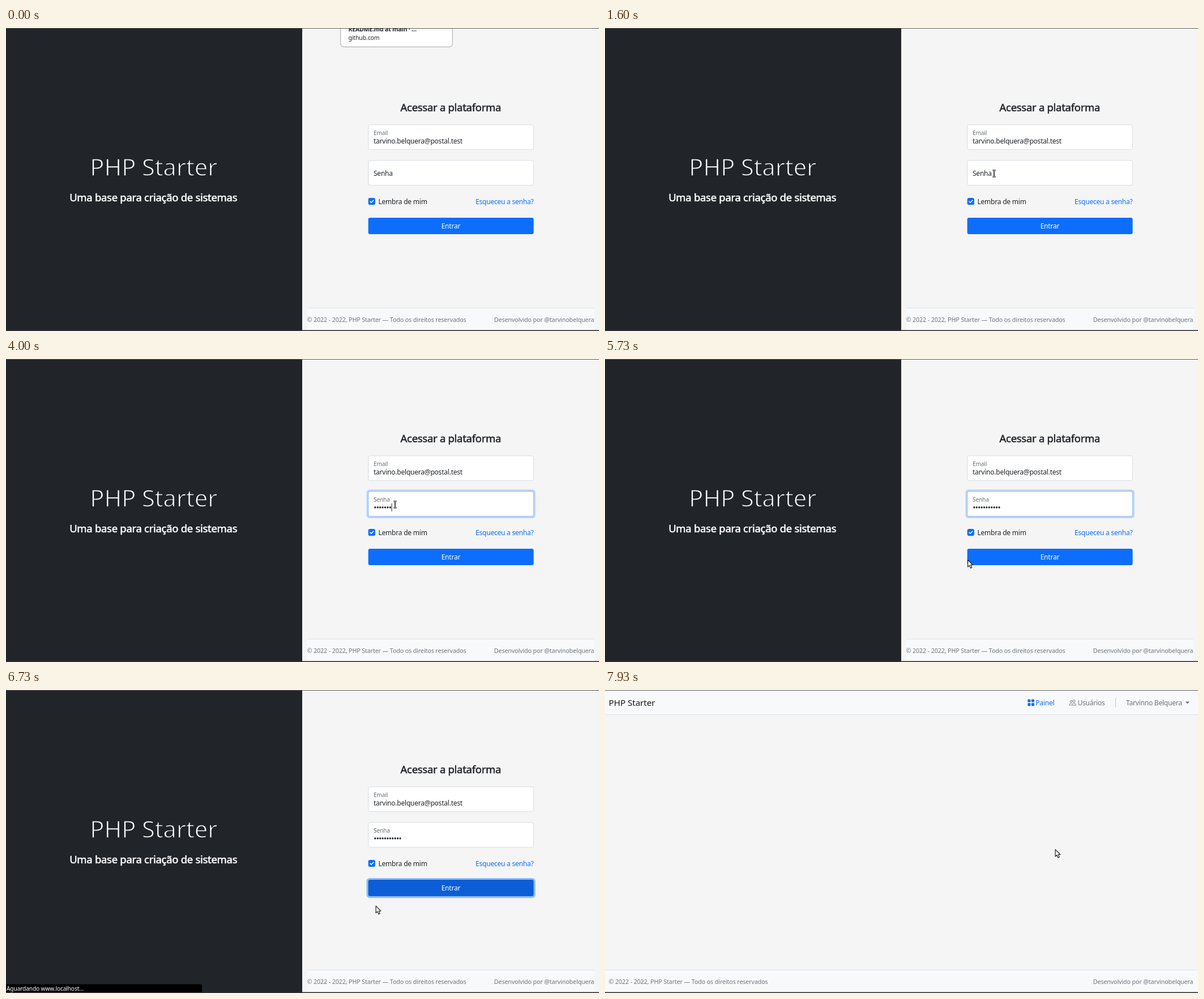
Write an HTML page that moves like this. It is 1047 by 535 pixels and loops after 8 s.

```html
<!DOCTYPE html>
<html lang="pt-BR">
<head>
<meta charset="utf-8">
<title>PHP Starter</title>
<style>
html, body { margin: 0; width: 100%; height: 100%; overflow: hidden; background: #f5f5f5; }
svg { display: block; width: 100%; height: 100%; }
text { font: 12px "Noto Sans", "Open Sans", sans-serif; letter-spacing: -.22px; fill: #212529; }
.end { text-anchor: end; }
.mid { text-anchor: middle; }
/* a stroke in the panel colour thins the glyphs to a light weight */
.display { font-size: 42.3px; letter-spacing: -.45px; fill: #fff; stroke: #212529; stroke-width: 1.4; }
.heading { font-size: 18.4px; letter-spacing: -.24px; stroke: #212529; stroke-width: .55; }
.label { font-size: 10.2px; letter-spacing: -.19px; fill: #6e7173; }
.small { font-size: 10.7px; letter-spacing: -.11px; fill: #6c757d; }
.tip { font-size: 10.5px; letter-spacing: -.15px; }
.tip.strong { font-weight: 700; letter-spacing: -.18px; }
.brand { font-size: 15.3px; letter-spacing: -.1px; fill: #191919; }
.status { font-size: 10.2px; letter-spacing: -.14px; fill: #fff; }
.white { fill: #fff; }
.heading.white { stroke: #fff; }
.blue { fill: #0d6efd; }
.nav { fill: #707172; }
.field { fill: #fff; stroke: #ced4da; stroke-width: .8; }
.focus { stroke: #86b7fe; }
.rule { stroke: #dee2e6; stroke-width: 1; }
.bar { fill: #f8f9fa; }
.outline { fill: none; stroke: #707172; stroke-width: .9; }
</style>
</head>
<body>
<svg viewBox="0 0 1047 535">
  <rect width="1047" height="535" fill="#f5f5f5"/>

  <g id="login">
    <rect width="523" height="535" fill="#212529"/>
    <text class="display mid" x="260.5" y="261">PHP Starter</text>
    <text class="heading mid white" x="260.2" y="305.5">Uma base para criação de sistemas</text>

    <text class="heading mid" x="785.3" y="147">Acessar a plataforma</text>
    <rect class="field" x="639.9" y="170.9" width="291.4" height="43.8" rx="3"/>
    <text class="label" x="649" y="188.5">Email</text>
    <text x="649" y="203.5">tarvino.belquera@postal.test</text>

    <rect id="fieldRing" class="blue" x="636.5" y="230.5" width="298.2" height="50.6" rx="5.5" opacity=".25"/>
    <rect id="field" class="field" x="639.9" y="233.9" width="291.4" height="43.8" rx="3"/>
    <text id="placeholder" x="649" y="260.5">Senha</text>
    <text id="label" class="label" x="649" y="251.5">Senha</text>
    <g id="dots" fill="#212529"></g>
    <rect id="caret" y="255" width="1" height="14" fill="#212529"/>

    <rect class="blue" x="639.6" y="300" width="12.3" height="12.3" rx="3"/>
    <path d="M642.9 306.3l2 2 3.9-4" fill="none" stroke="#fff" stroke-width="1.6" stroke-linecap="round" stroke-linejoin="round"/>
    <text x="657.5" y="310.5">Lembra de mim</text>
    <text class="end blue" x="931.5" y="310.5">Esqueceu a senha?</text>

    <rect id="buttonRing" x="636.5" y="332" width="298.2" height="35.2" rx="5.5" fill="#3184fd" opacity=".5"/>
    <rect id="button" x="639.6" y="335" width="292" height="29" rx="3"/>
    <text class="mid white" x="785.4" y="354.2">Entrar</text>

    <rect class="bar" x="532" y="494" width="506.5" height="39"/>
    <path class="rule" d="M532 494.5H1038.5"/>
    <text class="small" x="531.5" y="519">© 2022 - 2022, PHP Starter — Todo os direitos reservados</text>
  </g>

  <g id="panel">
    <path class="bar" d="M0 0H1047V43H0zM0 494H1047V535H0z"/>
    <path class="rule" d="M0 43.5H1047M0 494.5H1047"/>
    <text class="brand" x="6.5" y="27.7">PHP Starter</text>
    <g class="blue">
      <rect x="746.3" y="16.5" width="5.1" height="5.1" rx="1"/>
      <rect x="752.9" y="16.5" width="5.1" height="5.1" rx="1"/>
      <rect x="746.3" y="23.1" width="5.1" height="5.1" rx="1"/>
      <rect x="752.9" y="23.1" width="5.1" height="5.1" rx="1"/>
    </g>
    <text class="blue" x="760.3" y="26.7">Painel</text>
    <g class="outline">
      <circle cx="828" cy="19.6" r="2"/>
      <path d="M824.5 26.8c0-4.6 7.1-4.6 7.1 0z"/>
      <circle cx="823.2" cy="20.1" r="1.7"/>
      <path d="M823.6 26.8H820.1c0-2.6 1.4-3.7 4-3.5"/>
    </g>
    <text class="nav" x="834.5" y="26.7">Usuários</text>
    <path d="M901.5 14V31" stroke="#bfc0c1"/>
    <text class="nav" x="920" y="26.7">Tarvinno Belquera</text>
    <path class="nav" d="M1024.6 20.4h7.6l-3.8 3.9z"/>
    <text class="small" x="6.5" y="519">© 2022 - 2022, PHP Starter — Todo os direitos reservados</text>
  </g>

  <text class="small end" x="1038.5" y="519">Desenvolvido por @tarvinobelquera</text>

  <g id="tooltip">
    <rect x="590" y="-12" width="199" height="46.3" rx="7" fill="#000" opacity=".15"/>
    <rect x="590.8" y="-12" width="197.4" height="45.2" rx="6" fill="#fff" stroke="#aaa" stroke-width=".9"/>
    <text class="tip strong" x="604.5" y="6">README.md at main · …</text>
    <text class="tip" x="604.5" y="21.3">github.com</text>
  </g>

  <g id="status">
    <path d="M0 519.6H343.5a2.5 2.5 0 0 1 2.5 2.5V534H0z"/>
    <text class="status" x="1" y="530.7">Aguardando www.localhost…</text>
  </g>

  <rect width="1047" height="1" fill="#5a5a5c"/>
  <rect y="533.4" width="1047" height="1.6" fill="#333134"/>

  <g id="arrow">
    <path d="M.6.8V13.2L3.4 10.6 5.5 15.2 7.7 14.2 5.7 9.7H9.3z" fill="#fff" stroke="#111" stroke-width="1.1" stroke-linejoin="round"/>
  </g>
  <g id="beam" fill="none">
    <path d="M-2.6-5.6H2.6M0-5.6V5.6M-2.6 5.6H2.6" stroke="#111" stroke-width="2.4"/>
    <path d="M-2.6-5.6H2.6M0-5.6V5.6M-2.6 5.6H2.6" stroke="#fff" stroke-width=".7"/>
  </g>
  <g id="hand">
    <path d="M3.6 9V1.8a1.2 1.2 0 0 1 2.4 0V6.2Q7.2 5 8.2 6.4 9.4 5.4 10.3 6.9 12.3 6.2 12.3 8.4V11Q12.3 14.5 9 14.5H7Q5 14.5 3.8 12.6L.8 9Q.8 7.2 2.4 8z" fill="#fff" stroke="#111" stroke-width="1.1" stroke-linejoin="round"/>
  </g>
</svg>
<script>
const LOOP = 8000, ENTER = 1000, STEP = 600 / 9;
const DOT_PITCH = 4.42;
const KEYSTROKES = [2400, 2930, 3200, 3530, 3670, 3670, 4000, 4130, 4330, 4530, 4730];
// time, cursor shape, x, y
const POINTER = [
  [1600, "beam", 687, 257], [5330, "beam", 639, 282.5], [5530, "arrow", 589, 317],
  [5730, "arrow", 640, 354], [5930, "arrow", 674, 358], [6130, "hand", 672, 358],
  [6530, "arrow", 661, 370], [6730, "arrow", 652.5, 380.5], [6930, "arrow", 646.5, 390],
  [7930, "arrow", 794.5, 280.8]
];

const $ = id => document.getElementById(id);
const show = (id, on) => $(id).style.display = on ? "" : "none";
const within = (t, from, to) => t >= from && t < to;
const bezier = (u, a, b, c, d) =>
  (1 - u) ** 3 * a + 3 * u * (1 - u) ** 2 * b + 3 * u * u * (1 - u) * c + u ** 3 * d;

$("dots").innerHTML = KEYSTROKES.map((_, i) =>
  `<circle cx="${651.8 + DOT_PITCH * i}" cy="262" r="1.65"/>`).join("");
const dots = [...$("dots").children];

function pointerAt(t) {
  if (t < ENTER) return null;
  if (t < 1600) {
    const u = (Math.floor((t - ENTER) / STEP) + 1) / 10;
    const x = bezier(u, 600, 500, 520, 687), y = bezier(u, -20, 60, 200, 257);
    return [t, x > 640 && y > 234 ? "beam" : "arrow", x, y];
  }
  return POINTER.findLast(p => t >= p[0]);
}

function buttonColor(t) {
  if (t < 5930) return "#0d6efd";
  return within(t, 6330, 6530) ? "#0a58ca" : "#0b5ed7";
}

function render(t) {
  const focused = within(t, 2130, 6330);
  const typed = KEYSTROKES.filter(k => t >= k).length;
  show("login", t < 6930);
  show("panel", t >= 6930);
  show("fieldRing", focused);
  $("field").classList.toggle("focus", focused);
  show("placeholder", t < 2130);
  show("label", t >= 2130);
  dots.forEach((dot, i) => dot.style.display = i < typed ? "" : "none");
  show("caret", focused && !within(t, 5330, 5930));
  $("caret").setAttribute("x", 649.6 + DOT_PITCH * typed);
  show("buttonRing", t >= 6330);
  $("button").setAttribute("fill", buttonColor(t));

  const fade = t < ENTER ? 1 : 1 - (Math.floor((t - ENTER) / STEP) + 1) / 3;
  $("tooltip").setAttribute("opacity", Math.max(0, fade));
  show("status", within(t, 6730, 7470));
  $("status").setAttribute("opacity", t < 7270 ? 1 : .5);

  const pointer = pointerAt(t);
  for (const shape of ["arrow", "beam", "hand"]) {
    const on = !!pointer && pointer[1] === shape;
    show(shape, on);
    if (on) $(shape).setAttribute("transform", `translate(${pointer[2]} ${pointer[3]})`);
  }
}

const start = performance.now();
function tick() {
  render((performance.now() - start) % LOOP);
  requestAnimationFrame(tick);
}
tick();
</script>
</body>
</html>
```
